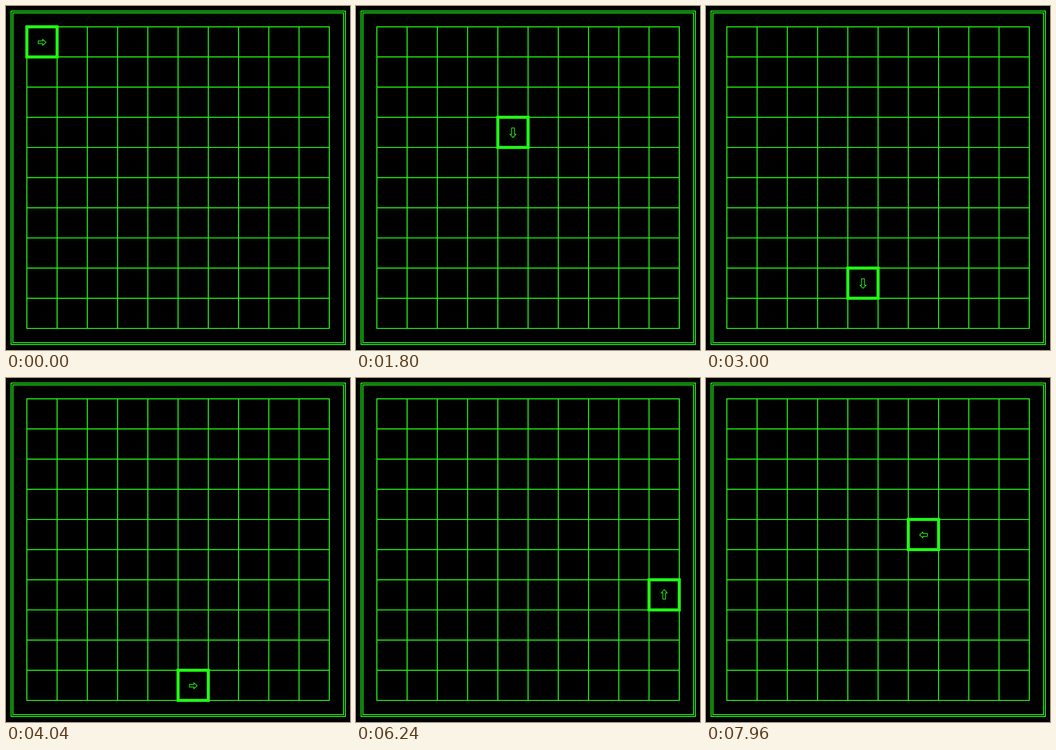
Recreate the animation shown at these times as an HTML page with a canvas. Size 747 by 749 pixels, loop 8000 ms.

```html
<!DOCTYPE html>
<html lang="en">
<head>
<meta charset="utf-8">
<title>Grid walker</title>
<style>
html, body { margin: 0; width: 100%; height: 100%; overflow: hidden; background: #000; }
canvas { display: block; }
</style>
</head>
<body>
<canvas id="stage" width="747" height="749"></canvas>
<script>
const ctx = document.getElementById('stage').getContext('2d');
const GREEN = '#20fc14';
const LOOP = 8000, TICK = 40, FIRST_STEP = 190, STEP = 217;
const ORIGIN = 45.3, CELL = 65.67, CELLS = 10;

// F = one cell forward, T = quarter turn clockwise
const PROGRAM = 'FFFF' + 'T' + 'FFFFFFFFF' + 'TTT' + 'FFFFF' + 'TTT' + 'FFFFF' + 'TTT' + 'FFF';
const DIRECTIONS = [[1, 0], [0, 1], [-1, 0], [0, -1]];

function poseAt(time) {
  const shown = Math.floor(time / TICK) * TICK;
  const steps = Math.max(0, Math.floor((shown - FIRST_STEP) / STEP) + 1);
  const pose = { col: 0, row: 0, dir: 0 };
  for (const command of PROGRAM.slice(0, steps)) {
    if (command === 'T') {
      pose.dir = (pose.dir + 1) % 4;
    } else {
      pose.col += DIRECTIONS[pose.dir][0];
      pose.row += DIRECTIONS[pose.dir][1];
    }
  }
  return pose;
}

function drawFrame() {
  ctx.lineWidth = 2;
  ctx.strokeRect(11, 11, 726, 726);
  ctx.strokeRect(15, 15, 718, 718);
}

function drawGrid() {
  const end = ORIGIN + CELL * CELLS;
  ctx.lineWidth = 2.2;
  ctx.beginPath();
  for (let i = 0; i <= CELLS; i++) {
    const p = ORIGIN + i * CELL;
    ctx.moveTo(p, ORIGIN - 1);
    ctx.lineTo(p, end + 1);
    ctx.moveTo(ORIGIN - 1, p);
    ctx.lineTo(end + 1, p);
  }
  ctx.stroke();
}

function drawArrow(x, y, dir) {
  const vertical = dir % 2 === 1;
  const half = vertical ? 10.4 : 8.4;
  const neck = half - 7;
  const shiftY = [0.9, 0.8, 0.9, -1][dir];
  ctx.save();
  ctx.translate(x + 0.2, y + shiftY);
  ctx.rotate(dir * Math.PI / 2);
  ctx.lineWidth = 1.5;
  ctx.beginPath();
  ctx.moveTo(-half, -3);
  ctx.lineTo(neck, -3);
  ctx.lineTo(neck, -6.4);
  ctx.lineTo(half, 0);
  ctx.lineTo(neck, 6.4);
  ctx.lineTo(neck, 3);
  ctx.lineTo(-half, 3);
  ctx.closePath();
  ctx.stroke();
  ctx.restore();
}

function drawWalker({ col, row, dir }) {
  const x = ORIGIN + col * CELL, y = ORIGIN + row * CELL;
  ctx.lineWidth = 6.6;
  ctx.strokeRect(x, y, CELL, CELL);
  drawArrow(x + CELL / 2, y + CELL / 2, dir);
}

function render(time) {
  ctx.fillStyle = '#000';
  ctx.fillRect(0, 0, 747, 749);
  ctx.strokeStyle = GREEN;
  drawFrame();
  drawGrid();
  drawWalker(poseAt(time));
}

const start = performance.now();
function loop() {
  render((performance.now() - start) % LOOP);
  requestAnimationFrame(loop);
}
loop();
</script>
</body>
</html>
```
